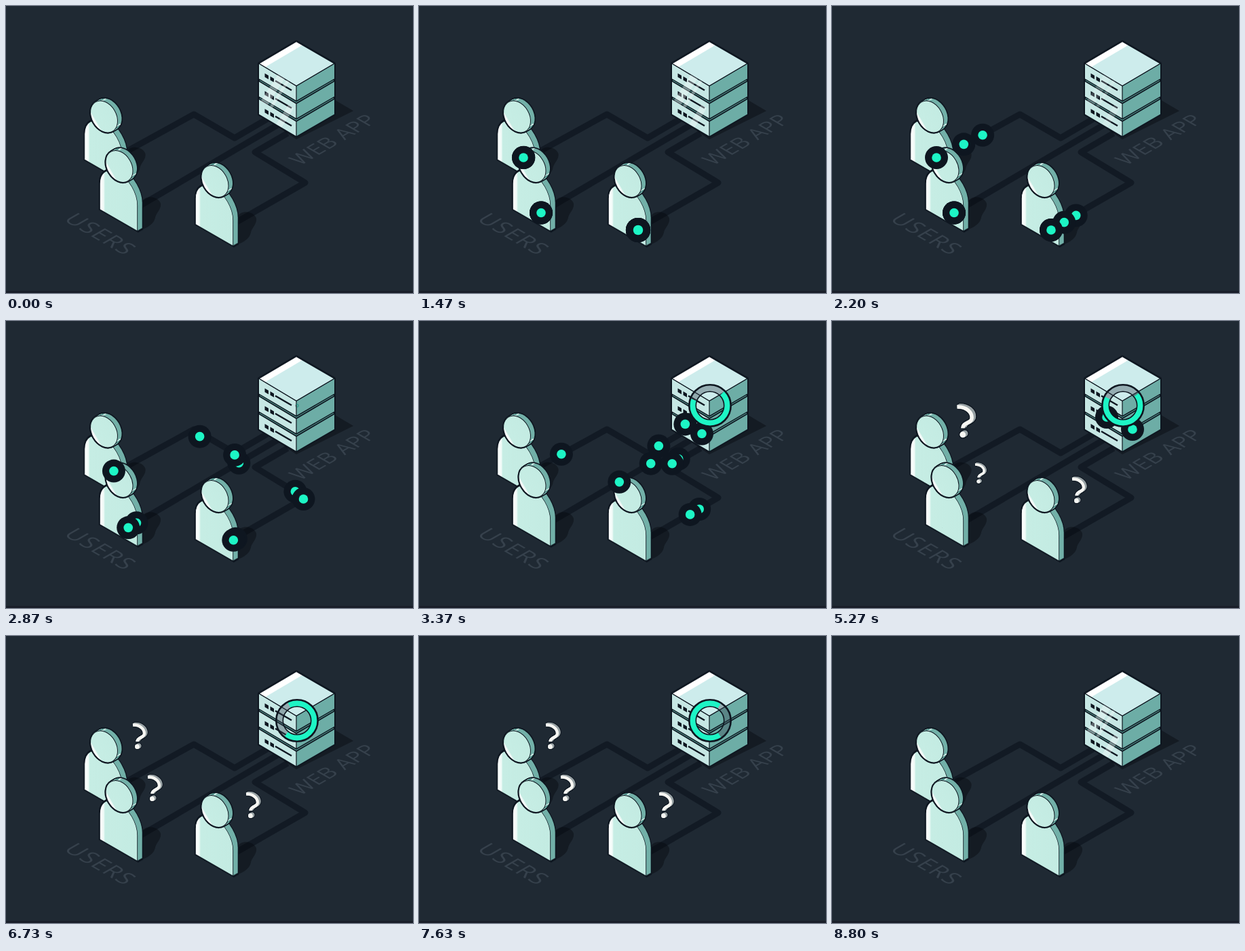
Write an HTML page that moves like this. It is 600 by 424 pixels and loops after 8.83 s.

```html
<!DOCTYPE html>
<html lang="en">
<head>
<meta charset="utf-8">
<title>Users and web app</title>
<style>
html, body { margin: 0; width: 100%; height: 100%; overflow: hidden; background: #1f2933; }
svg { display: block; width: 600px; height: 424px; }
text { font-family: "Open Sans", "Noto Sans", sans-serif; fill: #36414c; }
</style>
</head>
<body>
<svg id="stage" viewBox="0 0 600 424">
  <defs>
    <linearGradient id="rim">
      <stop offset=".6" stop-color="#a5dbd2"/><stop offset=".6" stop-color="#4f918a"/>
      <stop offset=".71" stop-color="#4f918a"/><stop offset=".71" stop-color="#e4f8f4"/>
      <stop offset=".76" stop-color="#e4f8f4"/><stop offset=".76" stop-color="#72b0a8"/>
    </linearGradient>
    <linearGradient id="skin">
      <stop offset="0" stop-color="#fff"/><stop offset=".1" stop-color="#f1fbf8"/>
      <stop offset=".14" stop-color="#c6ede4"/><stop offset="1" stop-color="#c3ebe2"/>
    </linearGradient>
    <clipPath id="front"><path d="M373 85L428 118V192L373 160Z"/></clipPath>
  </defs>
  <rect width="600" height="424" fill="#1f2933"/>
  <rect y="421" width="600" height="3" fill="#191e29"/>
  <text transform="matrix(.866 .5 -.866 .5 83.5 316)" font-size="33" letter-spacing="1.4">USERS</text>
  <text transform="matrix(.866 -.5 .866 .5 434 236)" font-size="31" letter-spacing=".3">WEB APP</text>
  <g fill="none" stroke="#121a24" stroke-width="9" stroke-linejoin="round">
    <path d="M172 218L277 160L337 195L390 164"/>
    <path d="M196 296L405 173"/>
    <path d="M335 322L441 261L367 216L415 188"/>
  </g>
  <g id="scene"></g>
  <g id="dots"></g>
  <g id="spinner">
    <circle r="25.5" fill="none" stroke="#3b4653" stroke-opacity=".38" stroke-width="9"/>
    <path id="arc" fill="none" stroke="#1df5c5" stroke-width="9"/>
    <circle r="30.7" fill="none" stroke="#0e1620" stroke-width="2.6"/>
    <circle r="20.7" fill="none" stroke="#0e1620" stroke-width="1.6"/>
  </g>
  <g id="marks"></g>
</svg>
<script>
const LOOP = 8830, INK = '#0e1620', TEAL = '#1df5c5';
const $ = id => document.getElementById(id);
const add = (parent, markup) => {
  parent.insertAdjacentHTML('beforeend', markup);
  return parent.lastElementChild;
};
const clamp = x => Math.max(0, Math.min(1, x));
const ease = x => (1 - Math.cos(Math.PI * clamp(x))) / 2;
const pop = u => u < .5 ? 1.28 * ease(u * 2) : 1.28 - .28 * ease(u * 2 - 1);

// Stack shifted copies of a shape to give it depth.
function extrude(draw, dx, dy, attrs) {
  let out = '';
  for (let i = 8; i >= 0; i--)
    out += `<g transform="translate(${dx * i / 8} ${dy * i / 8})">${draw(attrs)}</g>`;
  return out;
}
function solid(draw, dx, dy, side, face, outline) {
  return extrude(draw, dx, dy, `fill="${INK}" stroke="${INK}" stroke-width="${outline}"`) +
    extrude(draw, dx, dy, `fill="${side}"`) +
    draw(`fill="${face}" stroke="${INK}" stroke-width="1"`);
}

const body = a => `<path transform="matrix(.866 .5 0 1 166 316.5)"
  d="M-32 0V-38A32 32 0 0 1 32 -38V0Z" ${a}/>`;
const head = a => `<ellipse transform="translate(167 237) rotate(-30)" rx="18" ry="25" ${a}/>`;
const person = solid(body, 7, -4, '#72b0a8', 'url(#skin)', 3.4) +
  solid(head, 6, -3.5, 'url(#rim)', 'url(#skin)', 3.4);
const shadow = `<path fill="#05080d" fill-opacity=".42" d="M190 328L200 290C205 278 225 281 228 292
  C229 300 222 305 220 312C219 322 206 329 198 331Z"/>`;

function slab(y) {
  return `<g transform="translate(0 ${y})">
    <path fill="#c6e7e4" d="M373 85L428 118V140.5L373 108Z"/>
    <path fill="#6dada6" d="M428 118L484 85V108L428 140.5Z"/>
    <path fill="none" stroke="${INK}" stroke-width="1.2" d="M373 85L428 118L484 85M428 118V140.5M373 108L428 140.5L484 108"/>
    <path fill="${INK}" d="M381.5 99.5l5.5 3.2v5.6l-5.5-3.2zM389.5 104l5.5 3.2v5.6l-5.5-3.2z"/>
    <path stroke="${INK}" stroke-width="2.4" d="M397 110.5L421 124.5"/></g>`;
}
const seam = y => `<path transform="translate(0 ${y})" fill="none" stroke="#4d8a84"
  stroke-width="1.2" d="M374 110L428 142.3L483 110"/>`;
const server = `
  <path fill="#05080d" fill-opacity=".42" d="M373 160L428 197L512 155L470 130Z"/>
  <path fill="${INK}" stroke="${INK}" stroke-width="4" stroke-linejoin="round"
    d="M428 52.5L484 85V160L428 192L373 160V85Z"/>
  ${[0, 26.3, 52.5].map(slab).join('')}
  ${[0, 26.3].map(seam).join('')}
  <path fill="#cdecec" d="M428 52.5L484 85L428 118L373 85Z"/>
  <path fill="#fff" d="M373 85L428 52.5L437 57.7L382 90.3Z"/>
  <path fill="none" stroke="${INK}" stroke-width="1.2" d="M428 52.5L484 85L428 118L373 85Z"/>
  <g id="glare" clip-path="url(#front)" fill="#fff" fill-opacity=".33">
    <path d="M408 90L418 96L386 146L376 140ZM421 98L425 100L393 150L389 148Z"/>
    <path d="M416 146L424 151L400 190L392 185Z"/>
  </g>`;

const spots = [[-22.5, -73.5], [0, 0], [141, 22]];
const at = ([x, y], inner) => `<g transform="translate(${x} ${y})">${inner}</g>`;
$('scene').innerHTML = spots.map(p => at(p, shadow)).join('') + server +
  spots.map(p => at(p, person)).join('');

// Routes, with the time their dots pop up and each dot's [departure, travel time].
const routes = [
  { d: 'M180 305.5L417 166.5', pop: 650, dots: [[2210, 1060], [2715, 1060], [2850, 1060]] },
  { d: 'M323 331L442 261L366 216L443 160', pop: 800,
    dots: [[1575, 2640], [1790, 2420], [2540, 2150], [2560, 2300]] },
  { d: 'M154 224L275 165L337 198L405 142', pop: 700,
    dots: [[1420, 2300], [1500, 2740], [2670, 2300]] }
];
const dots = routes.flatMap(r => {
  const path = document.createElementNS('http://www.w3.org/2000/svg', 'path');
  path.setAttribute('d', r.d);
  const length = path.getTotalLength();
  return r.dots.map(([start, span]) => ({
    path, length, start, span, pop: r.pop,
    el: add($('dots'), `<g><circle r="17" fill="${INK}"/><circle r="6.8" fill="${TEAL}"/></g>`)
  }));
});

const hook = a => `<g ${a}><path fill="none" d="M-9 -16.5C2 -17 8 -10 8 -4C8 3 -2.5 1 -2.5 8"/>
  <circle cx="-2.5" cy="15.5" r="1.3"/></g>`;
const pen = (color, width) => `stroke="${color}" fill="${color}" stroke-width="${width}"`;
const mark = extrude(hook, 2.5, -1.4, pen(INK, 6.5)) +
  extrude(hook, 2.5, -1.4, pen('#98a2a5', 4.4)) + hook(pen('#f7f7f3', 4.2));
const marks = [[196, 148, 4970], [218, 225, 5100], [363, 250, 4620]].map(([x, y, start]) =>
  ({ x, y, start, el: add($('marks'), `<g>${mark}</g>`) }));

const ARC = 245, R = 25.5;
const end = ARC * Math.PI / 180;
$('arc').setAttribute('d',
  `M0 ${-R}A${R} ${R} 0 1 1 ${R * Math.sin(end)} ${-R * Math.cos(end)}`);

function place(el, x, y, scale) {
  el.style.display = scale > .01 ? '' : 'none';
  el.setAttribute('transform', `translate(${x} ${y}) scale(${scale})`);
}

function render(t) {
  for (const d of dots) {
    const p = d.path.getPointAtLength(d.length * ease((t - d.start) / d.span));
    const leave = ease((t - d.start - d.span - 420) / 250);
    place(d.el, p.x, p.y, pop(clamp((t - d.pop) / 800)) * (1 - leave));
  }
  $('glare').style.opacity = 1 - ease((t - 1900) / 700) + ease((t - 8100) / 600);
  const grow = ease((t - 2780) / 500) * (1 - ease((t - 7750) / 300));
  place($('spinner'), 429, 125, grow);
  const gap = 95 + (t - 3930) * .193;
  $('arc').setAttribute('transform', `rotate(${gap + (360 - ARC) / 2})`);
  for (const m of marks)
    place(m.el, m.x, m.y, pop(clamp((t - m.start) / 600)) * (1 - ease((t - 7700) / 350)));
}

const origin = performance.now();
function tick() {
  render((performance.now() - origin) % LOOP);
  requestAnimationFrame(tick);
}
tick();
</script>
</body>
</html>
```
